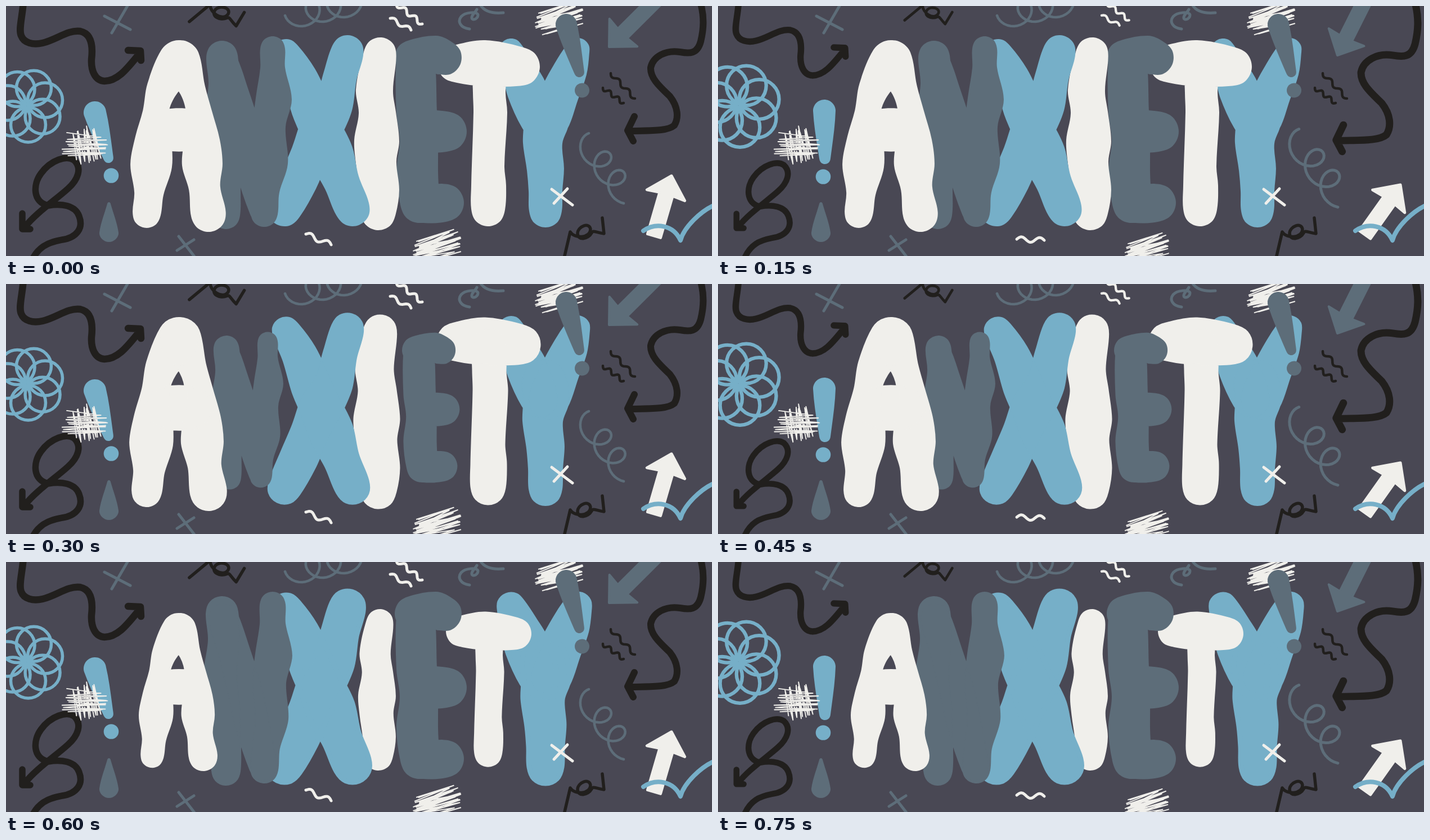
An HTML page that plays this animation: 1255x446 px, repeating every 900 ms.

```html
<!DOCTYPE html>
<html lang="en">
<head>
<meta charset="utf-8">
<title>Anxiety</title>
<style>
html, body { margin: 0; width: 100%; height: 100%; overflow: hidden; background: #494854; }
svg { display: block; width: 100vw; height: 100vh; }
</style>
</head>
<body>
<svg id="art" viewBox="0 0 1255 446" preserveAspectRatio="none" role="img" aria-label="ANXIETY"
  stroke-linecap="round" stroke-linejoin="round"></svg>
<script>
const STEP = 150;
const BLACK = '#211f1d', GREY = '#5d6d79', BLUE = '#76afc8', WHITE = '#f0efeb';
const { PI, cos, sin, atan2, hypot } = Math;
const art = document.getElementById('art');

function add(parent, tag, attrs) {
  const el = document.createElementNS('http://www.w3.org/2000/svg', tag);
  for (const key in attrs) el.setAttribute(key, attrs[key]);
  parent.appendChild(el);
  return el;
}

let seed = 7;
function random() {
  seed = seed * 16807 % 2147483647;
  return seed / 2147483647;
}

const polar = (x, y, r, angle) => [x + r * cos(angle), y + r * sin(angle)];
const sample = (n, fn) => Array.from({ length: n + 1 }, (_, i) => fn(i / n));
const poly = points => 'M' + points.join('L');

// Smooth closed curve; handles are a third of each span.
function smooth(points) {
  const n = points.length;
  const at = i => points[(i + n) % n];
  const lean = i => atan2(at(i + 1)[1] - at(i - 1)[1], at(i + 1)[0] - at(i - 1)[0]);
  let d = 'M' + points[0];
  for (let i = 0; i < n; i++) {
    const [a, b] = [at(i), at(i + 1)];
    const h = hypot(b[0] - a[0], b[1] - a[1]) / 3;
    d += `C${polar(...a, h, lean(i))} ${polar(...b, -h, lean(i + 1))} ${b}`;
  }
  return d + 'Z';
}

// Round-ended limb through "x y radius, x y radius, ..."
function limb(text) {
  const keys = text.split(',').map(k => k.trim().split(/\s+/).map(Number));
  const last = keys.length - 1;
  const side = list => list.flatMap(([x, y, r], i) => {
    const a = list[Math.max(0, i - 1)], b = list[Math.min(last, i + 1)];
    const dir = atan2(b[1] - a[1], b[0] - a[0]);
    if (i === 0) return [];
    if (i < last) return [polar(x, y, r, dir - PI / 2)];
    return sample(4, t => polar(x, y, r, dir + (t - .5) * PI));
  });
  return smooth([...side(keys), ...side(keys.slice().reverse())]);
}

// Ripple between two points
function wave(x0, y0, x1, y1, cycles, size) {
  const dir = atan2(y1 - y0, x1 - x0);
  return poly(sample(30, t => polar(x0 + (x1 - x0) * t, y0 + (y1 - y0) * t,
    size * cos(2 * PI * cycles * (t - .5)), dir + PI / 2)));
}

// Two and a half turns around a moving centre
function curl(x0, y0, x1, y1, r, start) {
  return poly(sample(70, t => polar(x0 + (x1 - x0) * t, y0 + (y1 - y0) * t, r, start - 5 * PI * t)));
}

// Quick back-and-forth scratch inside an oval
function scratch(x, y, dir, length, width, strokes) {
  return poly(sample(strokes, t => {
    const across = (t - .5 + (random() - .5) * .3) * width;
    const reach = length / 2 * (.65 + .35 * random()) * (1 - .8 * (t - .5) ** 2);
    seedSide = -seedSide;
    return polar(...polar(x, y, across, dir + PI / 2), reach * seedSide, dir);
  }));
}
let seedSide = 1;

function blockArrow(x0, y0, x1, y1) {
  const dir = atan2(y1 - y0, x1 - x0), length = hypot(x1 - x0, y1 - y0);
  const shaft = [[0, 12], [length - 34, 12], [length - 36, 35]];
  const outline = [...shaft, [length, 0], ...shaft.map(([u, v]) => [u, -v]).reverse()];
  return poly(outline.map(([u, v]) => polar(...polar(x0, y0, u, dir), v, dir + PI / 2))) + 'Z';
}

const line = (color, width, d, parent = art) =>
  add(parent, 'path', { d, fill: 'none', stroke: color, 'stroke-width': width });
const fill = (color, d, round = 0) =>
  add(art, 'path', { d, fill: color, stroke: color, 'stroke-width': round });
const dot = (color, cx, cy, r) => add(art, 'circle', { cx, cy, r, fill: color });

// Elements that alternate one attribute between two beats
const swaps = [];
const swap = (el, name, ...values) => swaps.push({ el, name, values });
const morph = (el, one, two) => swap(el, 'd', one, two);
function pulse(el, k, x, y) {
  const base = el.getAttribute('transform') || '';
  swap(el, 'transform', base, `translate(${x} ${y}) scale(${k}) ${base}`);
}

// Background doodles
line(GREY, 5, 'M217 -2L188 48M175 18L221 42');
line(GREY, 5, 'M307 411L335 447M334 417L304 436');
line(GREY, 4.5, curl(517, 17, 611, -3, 21, PI));
line(GREY, 5, 'M884 12C862 14 848 8 842 -4M824 41C808 39 802 28 809 19C816 11 838 9 839 16C839 24 827 27 828 20C829 14 835 11 837 6');
pulse(line(GREY, 4.5, curl(1036, 248, 1098, 331, 21, -PI / 2)), 1.115, -122.4, -33.6);
fill(GREY, limb('183 353 3, 183 404 17'));
morph(fill(GREY, '', 4), blockArrow(1165, -20, 1072, 73), blockArrow(1155, -20, 1101, 88));

pulse(line(BLACK, 12.5, 'M31 -8C29 20 22 42 27 53C32 66 48 70 65 66C90 60 110 42 132 45C155 50 154 78 152 95C151 115 158 133 175 134C200 134 218 108 238 84M217 79L239 80L240 97'),
  .91, 8.4, 2);
pulse(line(BLACK, 11.5, 'M40 470C52 426 80 421 100 417C126 413 138 396 130 375C123 355 98 352 75 356C47 350 48 318 62 299C80 274 108 266 121 275C136 289 128 310 110 326C88 346 52 370 33 395M29 370L29 398L43 398'),
  .915, 6.3, 32);
pulse(line(BLACK, 12, 'M1234 -8C1242 20 1240 42 1235 63C1229 86 1215 85 1198 82C1173 78 1150 90 1146 110C1145 130 1165 146 1180 161C1195 180 1196 200 1188 213C1175 224 1145 222 1108 223M1117 197L1105 222L1115 241'),
  1.08, -94.6, -.6);
line(BLACK, 4.5, wave(1075, 120, 1118, 165, 2.5, 3.5) + wave(1061, 146, 1098, 173, 2.5, 3.5));

const knot = 'M-11 47L0 0C8 13 36 11 36 -5C34 -18 14 -10 13 2C13 17 32 13 38 2C41 -4 44 1 60 3L57 -25';
const place = (el, transform) => { el.setAttribute('transform', transform); return el; };
place(line(BLACK, 5.5, knot), 'translate(1003 403)');
pulse(place(line(BLACK, 5.5, knot), 'translate(363 -3) rotate(37)'), .865, 49.9, 1.3);

const rosette = add(art, 'g', { fill: 'none', stroke: BLUE, 'stroke-width': 5.5 });
for (let i = 0; i < 7; i++) {
  const [cx, cy] = polar(37, 178, 34, .6 + i * 2 * PI / 7);
  add(rosette, 'circle', { cx, cy, r: 31 });
}
pulse(rosette, 1.14, -6, -25);

morph(fill(BLUE, ''), limb('158 190 20, 182 271 9'), limb('189 187 20, 190 272 10'));
swap(dot(BLUE, 187, 303, 13.3), 'cy', 302.5, 304.5);
line(WHITE, 1.9, scratch(141, 251, .05, 88, 36, 18) + scratch(145, 250, 1.45, 74, 40, 18));

pulse(line(WHITE, 5, wave(683, 22, 720, 43, 1.5, 3.5) + wave(694, -4, 740, 32, 2.5, 4)), .855, 98, -2);
morph(line(WHITE, 5, ''), wave(533, 407, 578, 426, 1.5, 4.5), wave(531, 416, 580, 418, 1.5, 4.5));

const scribble = scratch(766, 428, -.3, 92, 36, 36);
pulse(line(WHITE, 2, scribble), .92, 57.5, 38);
place(line(WHITE, 2, scribble), 'translate(217 -407)');

// Lettering from back to front: colour, centre, [scale, outline] per pose, limbs
const letters = [
  [BLUE, 958, 226, [[1, 0], [1, 2], [1, 9]], [
    '898 80 22, 912 115 30, 926 150 36, 948 205 33',
    '1016 79 22, 1004 112 30, 985 155 34, 965 205 36',
    '957 175 40, 960 210 40, 954 245 35, 959 292 33, 959 330 30, 959 366 29']],
  [WHITE, 858, 227.5, [[1, 0], [1, 3], [.835, 0]], [
    '801 103 34, 850 102 41, 914 108 35',
    '860 110 30, 859 155 29, 861 190 30, 857 285 29, 858 320 31, 857 363 30']],
  [GREY, 756, 222, [[1, 0], [.8, 0], [1, 0]], [
    '723 92 32, 765 87 34, 778 92 32',
    '728 95 34, 730 190 36, 734 240 34, 731 295 37, 735 353 34',
    '740 224 36, 783 224 36',
    '735 355 32, 780 351 34']],
  [WHITE, 662, 228, [[1, 0], [1, 3], [.837, 0]], [
    '665 85 29, 655 150 33, 660 190 33, 659 240 40, 658 280 36, 664 330 35, 662 369 31']],
  [BLUE, 560, 223, [[1, 0], [1, 1.5], [1, 9]], [
    '498 84 25, 521 125 31, 542 180 36, 558 217 37, 578 265 40, 597 315 32, 616 362 31',
    '607 81 29, 594 125 30, 583 175 34, 561 217 38, 540 265 34, 520 312 34, 495 363 30']],
  [GREY, 426, 226.5, [[1, 0], [.817, 0], [1, 2]], [
    '384 90 28, 387 140 27, 381 200 29, 386 270 30, 392 330 25, 391 373 25',
    '386 100 26, 405 160 28, 422 220 30, 438 290 30, 457 365 24',
    '474 76 22, 474 110 22, 476 165 32, 468 215 29, 472 280 29, 462 330 24, 459 370 24']],
  [WHITE, 306, 231.5, [[1, 0], [1, 4], [.825, 0]], [
    '307 97 36, 276 150 27, 266 190 23, 262 235 32, 258 285 37, 254 335 26, 250 371 25',
    '309 97 36, 332 150 23, 343 190 23, 348 240 32, 349 283 36, 353 325 28, 360 372 31',
    '285 221 37, 330 221 37']]
].map(([color, x, y, poses, limbs]) =>
  ({ el: fill(color, limbs.map(limb).join('')), x, y, poses }));

// Foreground doodles
fill(GREY, limb('996 33 19, 1019 118 9'));
dot(GREY, 1024, 150.5, 13);
line(WHITE, 5, 'M970 327L1007 355M998 326L974 352');
morph(fill(WHITE, '', 5), blockArrow(1152, 410, 1183, 303), blockArrow(1150, 408, 1213, 319));
line(BLUE, 8, 'M1133 401C1155 386 1186 390 1199 418C1205 395 1235 365 1262 354');

function draw(time) {
  const step = Math.floor(time % (6 * STEP) / STEP);
  for (const { el, name, values } of swaps) el.setAttribute(name, values[step % 2]);
  for (const { el, x, y, poses } of letters) {
    const [k, outline] = poses[step >> 1];
    el.setAttribute('transform', `translate(${x * (1 - k)} ${y * (1 - k)}) scale(${k})`);
    el.setAttribute('stroke-width', outline);
  }
}

function loop() {
  draw(performance.now());
  requestAnimationFrame(loop);
}
loop();
</script>
</body>
</html>
```
